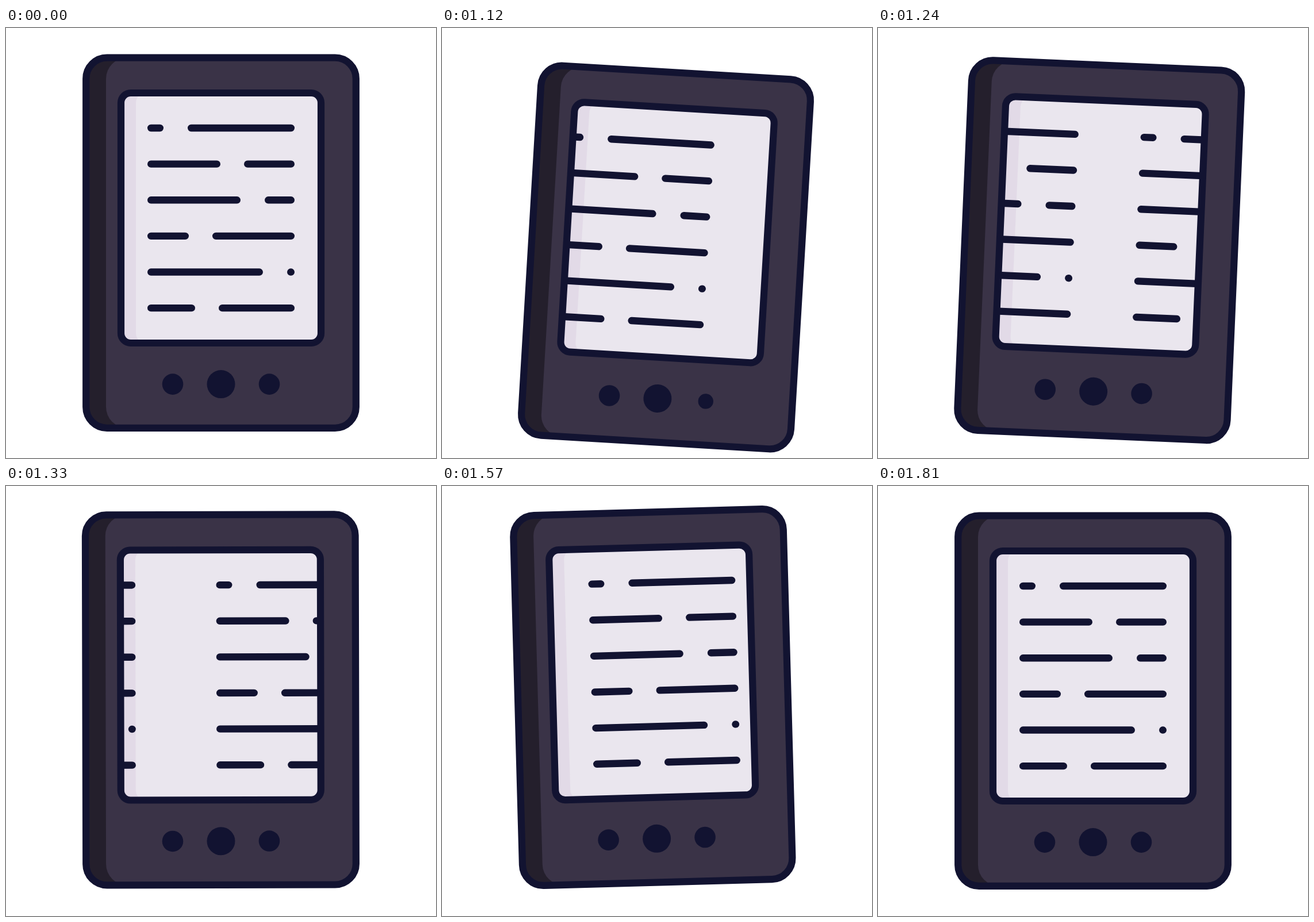
An HTML page with a canvas for the animation above (1840 ms loop, 748 by 748 pixels).

```html
<!DOCTYPE html>
<html lang="en">
<head>
<meta charset="utf-8">
<title>Reader page turn</title>
<style>
  html, body { margin: 0; width: 100%; height: 100%; overflow: hidden; background: #fff; }
  canvas { display: block; width: 748px; height: 748px; }
</style>
</head>
<body>
<canvas id="stage" width="748" height="748"></canvas>
<script>
const ctx = document.getElementById('stage').getContext('2d');
const LOOP = 1840, START = 1030, STEP = 30, REST = 1810;
const INK = '#121331', BODY = '#3a3347', SIDE = '#241f2c', PAGE = '#eae6ee', EDGE = '#e2dae7';
const PIVOT = { x: 374, y: 635 };

// [time, value] keys, eased between
const TILT = [[1000, 0], [1150, 3.8], [1440, -2], [1480, -2], [1780, 0]];
const DROP = [[990, 0], [1121, 24.8], [1410, -8], [1480, -8], [1780, 0]];
const PRESS = [[985, 1], [1070, 0.62], [1218, 1]];

// per row: end of the first dash, start of the second
const ROWS = [[274, 316], [373, 414], [408, 450], [318, 359], [447, 489], [329, 370]];

const smooth = p => p * p * (3 - 2 * p);

function track(keys, t) {
  if (t <= keys[0][0]) return keys[0][1];
  for (let i = 1; i < keys.length; i++) {
    const [t0, a] = keys[i - 1], [t1, b] = keys[i];
    if (t < t1) return a + (b - a) * smooth((t - t0) / (t1 - t0));
  }
  return keys[keys.length - 1][1];
}

function box(x0, y0, x1, y1, r) {
  ctx.beginPath();
  ctx.roundRect(x0, y0, x1 - x0, y1 - y0, r);
}

function dot(x, y, r) {
  ctx.beginPath();
  ctx.arc(x, y, r, 0, Math.PI * 2);
  ctx.fill();
}

// rounded panel with a shaded strip on its left side
function panel(x0, y0, x1, y1, r, inset, dark, light, content) {
  ctx.save();
  box(x0, y0, x1, y1, r);
  ctx.clip();
  ctx.fillStyle = dark;
  ctx.fillRect(x0, y0, x1 - x0, y1 - y0);
  box(inset, y0, x1 + r, y1, r);
  ctx.fillStyle = light;
  ctx.fill();
  if (content) content();
  ctx.restore();
  box(x0, y0, x1, y1, r);
  ctx.strokeStyle = INK;
  ctx.lineWidth = 12.2;
  ctx.stroke();
}

function page(dx) {
  const cap = 6.2;
  ctx.strokeStyle = INK;
  ctx.lineWidth = 2 * cap;
  ctx.lineCap = 'round';
  ctx.beginPath();
  ROWS.forEach(([end, start], i) => {
    const y = 174 + 62.63 * i;
    for (const [a, b] of [[246, end], [start, 502]]) {
      ctx.moveTo(dx + a + cap, y);
      ctx.lineTo(dx + Math.max(b - cap, a + cap + 0.1), y);
    }
  });
  ctx.stroke();
}

function pages(t) {
  if (t < START || t >= REST) return page(0);
  page(-460 * smooth(Math.min(1, (t - 990) / 600)));
  page(Math.pow(0.00908 * (1874 - t), 3));
}

function draw(t) {
  ctx.setTransform(1, 0, 0, 1, 0, 0);
  ctx.fillStyle = '#fff';
  ctx.fillRect(0, 0, 748, 748);
  ctx.translate(PIVOT.x, PIVOT.y + track(DROP, t));
  ctx.rotate(track(TILT, t) * Math.PI / 180);
  ctx.translate(-PIVOT.x, -PIVOT.y);

  panel(139.2, 51.7, 608.8, 695.8, 36.5, 174, SIDE, BODY);
  panel(200, 113, 548, 548, 17, 226, EDGE, PAGE, () => pages(t));

  ctx.fillStyle = INK;
  dot(290, 619.6, 18.3);
  dot(374, 619.6, 24.5);
  dot(458, 619.6, 18.3 * track(PRESS, t));
}

function tick() {
  const t = performance.now() % LOOP;
  draw(t < START ? 0 : START + STEP * Math.floor((t - START) / STEP));
  requestAnimationFrame(tick);
}
tick();
</script>
</body>
</html>
```
